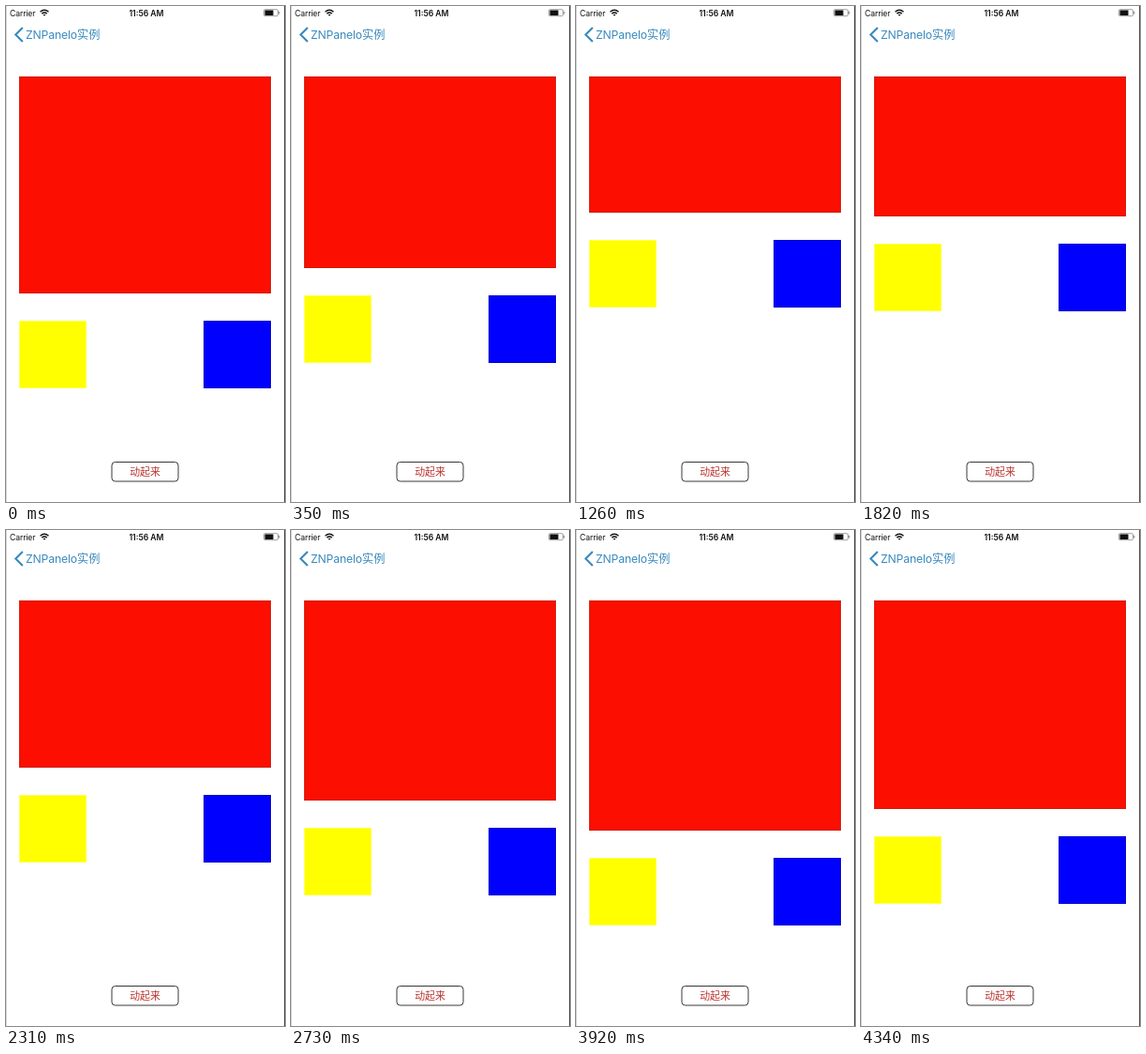
Write an HTML page that moves like this. It is 298 px wide and 528 px high and loops after 4.41 s.

```html
<!DOCTYPE html>
<html lang="zh">
<head>
<meta charset="utf-8">
<style>
  html, body { margin: 0; width: 100%; height: 100%; overflow: hidden; background: #fff; }
  svg { display: block; width: 298px; height: 528px; }
  text { font-family: Inter, "Noto Sans CJK SC", "Noto Sans CJK", sans-serif; }
</style>
</head>
<body>
<svg viewBox="0 0 298 528">
  <path d="M297.5 0V528" stroke="#555"/>
  <path d="M.25 0V528" stroke="#999" stroke-width=".5"/>

  <!-- status bar -->
  <g font-size="8.6" fill="#111">
    <text x="4" y="10.5" letter-spacing="-.1">Carrier</text>
    <text x="150" y="10.5" text-anchor="middle" font-weight="600">11:56 AM</text>
  </g>
  <g fill="none" stroke="#111" stroke-width="1.4">
    <path d="M36.5 6.2Q41 2.2 45.5 6.2M38.3 8.1Q41 5.8 43.7 8.1"/>
    <path d="M39.6 9.2Q41 8.2 42.4 9.2L41 10.8Z" fill="#111" stroke="none"/>
  </g>
  <rect x="275.5" y="3.7" width="15" height="7" rx="1.3" fill="#fff" stroke="#777" stroke-width=".7"/>
  <rect x="276.5" y="4.5" width="9" height="5.5" fill="#111"/>
  <path d="M291.8 5.8v2.8" stroke="#777"/>

  <!-- navigation bar -->
  <path d="M17.8 23L10.3 30.5L17.8 38" fill="none" stroke="#3a8abd" stroke-width="2.1"/>
  <text x="21" y="35" font-size="12.24" letter-spacing="-.15" fill="#3a8abd">ZNPanelo实例</text>

  <!-- blocks, each with a one pixel rim -->
  <rect id="red" x="14.5" y="75.5" width="268" fill="#fc0f00" stroke="#d01a08"/>
  <g id="pair">
    <rect x="14.5" y=".5" width="71" height="71" fill="#ff0" stroke="#ffff50"/>
    <rect x="211.5" y=".5" width="71" height="71" fill="#00f" stroke="#0000c8"/>
  </g>

  <rect x="113" y="485.5" width="71" height="20.5" rx="3.6" fill="#fff" stroke="#222" stroke-width=".9"/>
  <text x="148.5" y="500" font-size="10.9" text-anchor="middle" fill="#b8332e">动起来</text>
</svg>
<script>
  const LOOP = 4410, STEP = 70;
  const LOW_AT = 1470, HIGH_AT = 3595, FALL = 2080;
  const TOP = 75, LOW = 217.9, HIGH = 325.2, GAP = 29;
  const red = document.getElementById('red');
  const pair = document.getElementById('pair');

  // cubic-bezier(.42, 0, .58, 1), solved by bisection
  function ease(x) {
    let lo = 0, hi = 1, s = 0.5;
    for (let i = 0; i < 20; i++) {
      s = (lo + hi) / 2;
      const r = 1 - s;
      if (1.26 * r * r * s + 1.74 * r * s * s + s ** 3 < x) lo = s;
      else hi = s;
    }
    return s * s * (3 - 2 * s);
  }

  function level(t) {
    if (t < LOW_AT) return ease((LOW_AT - t) / FALL);
    if (t < HIGH_AT) return ease((t - LOW_AT) / (HIGH_AT - LOW_AT));
    return 1 - ease((t - HIGH_AT) / FALL);
  }

  const start = performance.now();
  function draw(now) {
    const t = Math.floor(Math.max(0, now - start) % LOOP / STEP) * STEP;
    const bottom = Math.round(LOW + (HIGH - LOW) * level(t));
    red.setAttribute('height', bottom - TOP - 1);
    pair.setAttribute('transform', `translate(0 ${bottom + GAP})`);
    requestAnimationFrame(draw);
  }
  draw(start);
</script>
</body>
</html>
```
